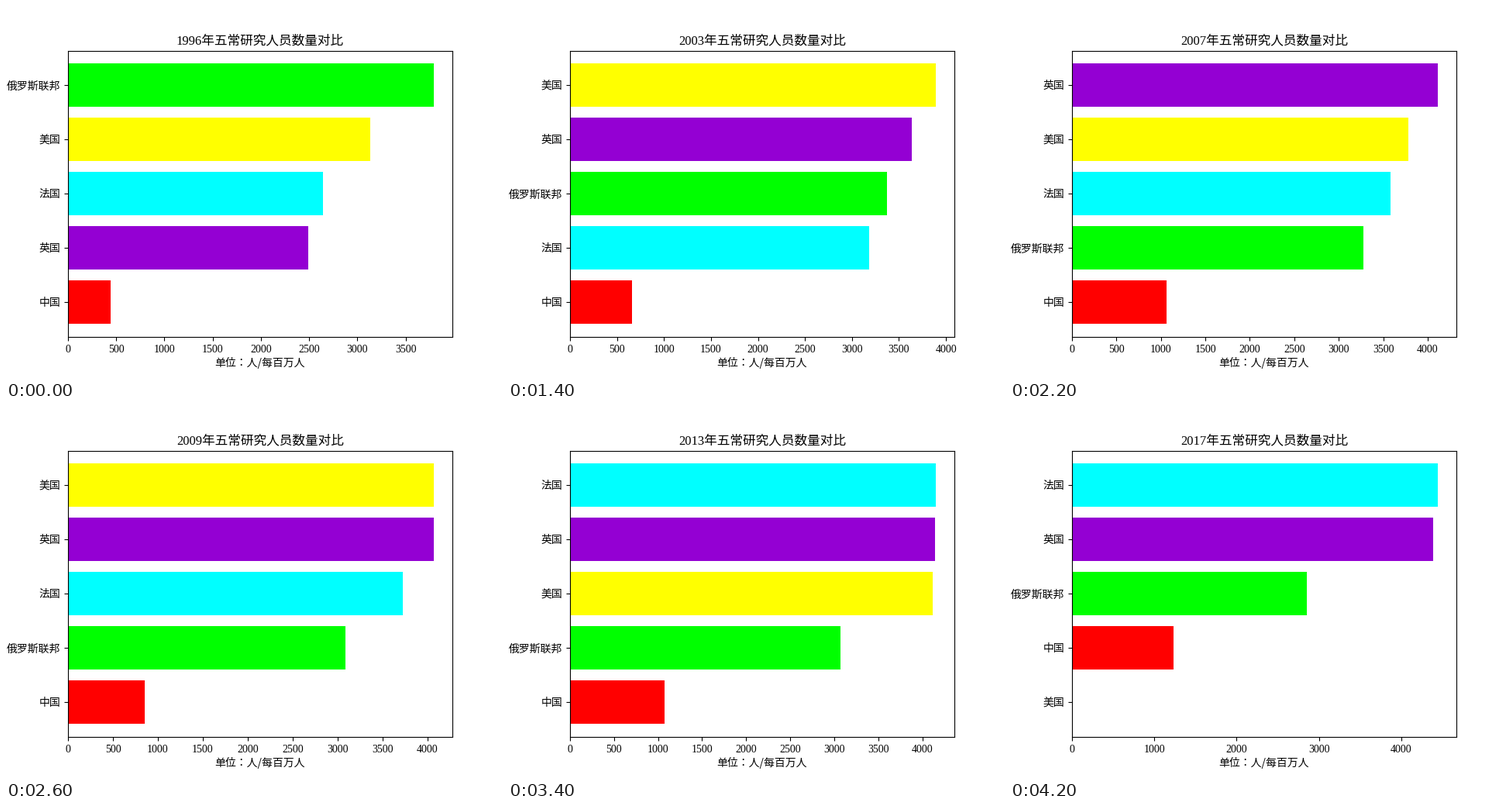
A matplotlib script for the animation above (4400 ms loop, 640x480 px).

```python
import matplotlib.pyplot as plt
from matplotlib.animation import FuncAnimation

plt.rcParams["font.family"] = ["Liberation Serif", "Noto Sans CJK JP"]

FIRST_YEAR = 1996

# Researchers per million people, one value per year; 0 means no data.
SERIES = {
    "中国": ("red", [
        443, 475, 388, 424, 544, 581, 628, 662, 708, 849, 922,
        1066, 1186, 853, 890, 964, 1020, 1072, 1093, 1159, 1206, 1234]),
    "英国": ("darkviolet", [
        2491, 2501, 2703, 2822, 2893, 3081, 3341, 3636, 3821, 4125, 4185,
        4117, 4059, 4066, 4051, 3942, 3998, 4146, 4255, 4306, 4380, 4385]),
    "法国": ("cyan", [
        2644, 2641, 2650, 2717, 2885, 2959, 3100, 3181, 3328, 3310, 3426,
        3582, 3640, 3727, 3868, 3940, 4068, 4156, 4201, 4240, 4339, 4446]),
    "美国": ("yellow", [
        3132, 3295, 3398, 3463, 3495, 3559, 3637, 3895, 3760, 3731, 3794,
        3780, 3912, 4072, 3885, 4037, 4016, 4114, 4232, 4266, 0, 0]),
    "俄罗斯联邦": ("lime", [
        3796, 3606, 3318, 3383, 3462, 3468, 3388, 3371, 3319, 3235, 3240,
        3276, 3153, 3090, 3088, 3126, 3096, 3072, 3102, 3098, 2979, 2852]),
}
YEARS = len(SERIES["中国"][1])

fig, ax = plt.subplots(figsize=(6.4, 4.8), dpi=100)


def draw_year(i):
    ax.clear()
    ranked = sorted(SERIES, key=lambda name: SERIES[name][1][i])
    values = [SERIES[name][1][i] for name in ranked]
    colors = [SERIES[name][0] for name in ranked]
    ax.barh(range(len(ranked)), values, color=colors)
    ax.set_yticks(range(len(ranked)), ranked)
    ax.set_title(f"{FIRST_YEAR + i}年五常研究人员数量对比")
    ax.set_xlabel("单位：人/每百万人", va="center", family="Noto Sans CJK JP")
    ax.xaxis.set_label_coords(0.5, -0.089)


anim = FuncAnimation(fig, draw_year, frames=YEARS, interval=200,
                     repeat=True, repeat_delay=0)
plt.show()
```
